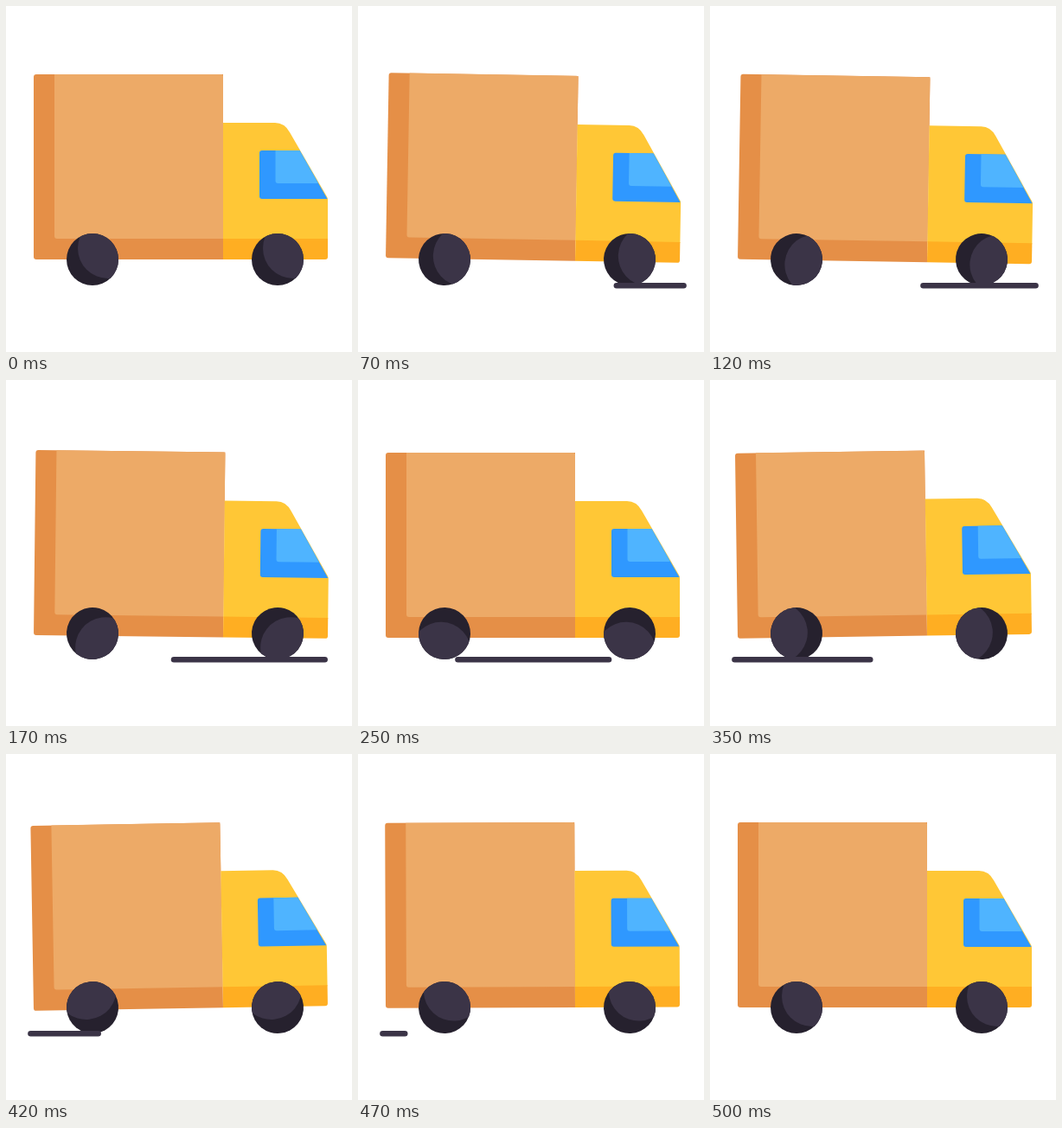
An HTML page that plays this animation: 400 by 400 pixels, repeating every 0.52 s.

```html
<!DOCTYPE html>
<html lang="en">
<head>
<meta charset="utf-8">
<title>Delivery truck</title>
<style>
html, body { margin: 0; width: 100%; height: 100%; overflow: hidden; background: #fff; }
svg { display: block; width: 100vw; height: 100vh; }
</style>
</head>
<body>
<svg viewBox="0 0 400 400">
  <defs>
    <clipPath id="rim"><circle r="30"/></clipPath>
    <g id="wheel">
      <circle r="30" fill="#26212e"/>
      <circle cx="18" cy="-13" r="35" fill="#3b3447" clip-path="url(#rim)"/>
    </g>
  </defs>
  <g id="body">
    <path fill="#e58f47" d="M35 79H251V293H35q-3 0-3-3V82q0-3 3-3z"/>
    <path fill="#edaa67" d="M56 79H249q2 0 2 2V269H59q-3 0-3-3z"/>
    <path fill="#ffc736" d="M251 135H311Q322 135 328 146L371 220.500Q372 222 372 224V270H251z"/>
    <path fill="#ffae22" d="M251 269H372V290q0 3-3 3H251z"/>
    <path fill="#2f98ff" d="M296 167H339.500L371.500 223H296q-3 0-3-3V170q0-3 3-3z"/>
    <path fill="#4fb4ff" d="M311.500 167H339.500L361.200 205H314.500q-3 0-3-3z"/>
  </g>
  <g transform="translate(100 293)"><use href="#wheel" class="spin"/></g>
  <g transform="translate(314 293)"><use href="#wheel" class="spin"/></g>
  <path id="road" stroke="#3b3447" stroke-width="6.600" stroke-linecap="round"/>
</svg>
<script>
const LOOP = 520, STEPS = 20, PEAK = STEPS / 6;
const truck = document.getElementById("body");
const road = document.getElementById("road");
const wheels = document.querySelectorAll(".spin");
const ease = p => (1 - Math.cos(Math.PI * p)) / 2;

// Tilt forward, then back, returning to level.
function tilt(k) {
  if (k < PEAK) return ease(k / PEAK);
  if (k > STEPS - PEAK) return -ease((STEPS - k) / PEAK);
  return 1 - 2 * ease((k - PEAK) / (STEPS - 2 * PEAK));
}

function draw(time) {
  const t = time % LOOP;
  // Steps alternate between 20 and 30 ms.
  const k = Math.min(STEPS, 2 * Math.floor(t / 50) + (t % 50 >= 20));

  const drop = 5 * ease(k / 10);
  truck.setAttribute("transform", `translate(0 ${drop}) rotate(${tilt(k)} 202 293)`);

  const angle = 360 * (k / STEPS) ** 1.4;
  wheels.forEach(w => w.setAttribute("transform", `rotate(${angle})`));

  const left = 377.5 - 26.2 * k;
  const from = Math.max(28.5, left), to = Math.min(376.5, left + 174.5);
  road.setAttribute("d", from < to ? `M${from} 323.300H${to}` : "");

  requestAnimationFrame(draw);
}
requestAnimationFrame(draw);
</script>
</body>
</html>
```
